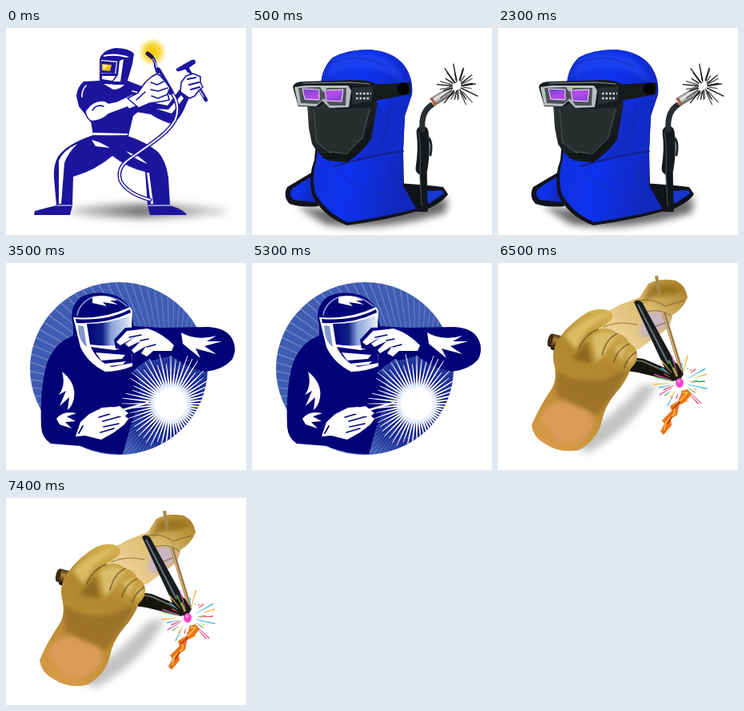
Recreate the animation shown at these times as an HTML page. Size 300 by 259 pixels, loop 8000 ms.

```html
<!DOCTYPE html>
<html lang="en">
<head>
<meta charset="utf-8">
<title>Welding</title>
<style>
html, body { margin: 0; width: 100%; height: 100%; overflow: hidden; background: #fff; }
svg { display: block; width: 100vw; height: 100vh; }
.scene { visibility: hidden; animation: 8s step-end infinite; }
#fighter { animation-name: first; }
#hood { animation-name: second; }
#badge { animation-name: third; }
#gloves { animation-name: fourth; }
@keyframes first { 0% { visibility: visible } 6.25%, 100% { visibility: hidden } }
@keyframes second { 0% { visibility: hidden } 6.25% { visibility: visible } 43.75%, 100% { visibility: hidden } }
@keyframes third { 0% { visibility: hidden } 43.75% { visibility: visible } 81.25%, 100% { visibility: hidden } }
@keyframes fourth { 0% { visibility: hidden } 81.25%, 100% { visibility: visible } }
.ink { fill: #1c159c; }
.cut { fill: #fff; stroke: #1c159c; stroke-width: 1.6; stroke-linejoin: round; }
.line { fill: none; stroke-linecap: round; stroke-linejoin: round; }
.w { fill: #fff; }
.navy { fill: #030378; }
</style>
</head>
<body>
<svg viewBox="0 0 300 259" preserveAspectRatio="none">
<defs>
  <filter id="soft" x="-30%" y="-60%" width="160%" height="220%"><feGaussianBlur stdDeviation="5"/></filter>
  <filter id="blur" x="-30%" y="-30%" width="160%" height="160%"><feGaussianBlur stdDeviation="2.5"/></filter>
  <radialGradient id="glow">
    <stop offset="0" stop-color="#f6c80c"/><stop offset=".5" stop-color="#f9d838"/><stop offset="1" stop-color="#fff3a0" stop-opacity="0"/>
  </radialGradient>
  <linearGradient id="floor">
    <stop offset="0" stop-color="#888" stop-opacity=".35"/><stop offset=".45" stop-color="#777"/><stop offset="1" stop-color="#aaa" stop-opacity=".35"/>
  </linearGradient>
  <linearGradient id="cloth" x1="0" x2="1" y2=".3">
    <stop offset="0" stop-color="#1230d2"/><stop offset=".5" stop-color="#0d32ee"/><stop offset="1" stop-color="#1228bd"/>
  </linearGradient>
  <linearGradient id="mask" x2="1" y2="1">
    <stop offset="0" stop-color="#343839"/><stop offset=".4" stop-color="#202425"/><stop offset="1" stop-color="#0b0d10"/>
  </linearGradient>
  <linearGradient id="steel" x2="0" y2="1">
    <stop offset="0" stop-color="#777"/><stop offset=".35" stop-color="#f2f2f2"/><stop offset="1" stop-color="#555"/>
  </linearGradient>
  <linearGradient id="lens" x2="1" y2="1">
    <stop offset="0" stop-color="#7040d4"/><stop offset=".5" stop-color="#b84ce6"/><stop offset="1" stop-color="#8444dc"/>
  </linearGradient>
  <radialGradient id="sky" gradientUnits="userSpaceOnUse" cx="206" cy="176" r="190">
    <stop offset="0" stop-color="#0b1585"/><stop offset=".27" stop-color="#142590"/><stop offset=".42" stop-color="#3e5cb2"/><stop offset="1" stop-color="#405cb2"/>
  </radialGradient>
  <linearGradient id="glass">
    <stop offset="0" stop-color="#030378"/><stop offset=".35" stop-color="#12208a"/><stop offset=".55" stop-color="#8ba2d8"/><stop offset="1" stop-color="#e6edfb"/>
  </linearGradient>
  <linearGradient id="hide" x1=".7" x2=".3" y2="1">
    <stop offset="0" stop-color="#d6b450"/><stop offset=".35" stop-color="#b18730"/><stop offset=".65" stop-color="#bd8d35"/><stop offset="1" stop-color="#d69a48"/>
  </linearGradient>
  <linearGradient id="hide2" x1=".1" y1=".7" x2="1" y2="0">
    <stop offset="0" stop-color="#efd39a"/><stop offset=".5" stop-color="#d9b96a"/><stop offset="1" stop-color="#a37a20"/>
  </linearGradient>
  <linearGradient id="brass" x2="0" y2="1">
    <stop offset="0" stop-color="#4c3510"/><stop offset=".4" stop-color="#b28a36"/><stop offset="1" stop-color="#2b1c08"/>
  </linearGradient>
  <clipPath id="disc"><ellipse cx="141" cy="132" rx="111" ry="108"/></clipPath>
  <clipPath id="palm"><path id="palmShape" d="M42 203Q51 181 66 159Q75 146 70 126Q66 108 78 92Q92 73 113 61Q132 54 142 62Q146 69 137 75L125 83Q139 79 149 88Q160 90 164 100Q174 105 174 116Q174 125 166 132Q160 149 147 163Q133 179 129 201Q123 222 101 234Q77 239 57 225Q44 218 42 203Z"/></clipPath>
</defs>

<g id="fighter" class="scene">
  <ellipse cx="178" cy="229" rx="102" ry="9" fill="url(#floor)" filter="url(#soft)"/>
  <circle cx="183" cy="30" r="18" fill="url(#glow)"/>
  <g id="halo"></g>
  <path class="ink" d="M109 134Q76 145 65 161Q59 171 60 188L63 222Q50 225 36 229L35 234H80L83 222L84 186Q112 178 133 160Q152 175 174 180L177 222L180 234H226Q222 227 205 222L203 187Q200 166 190 155Q174 142 152 135Z"/>
  <path class="w" d="M66 166Q71 153 89 145Q77 157 73 169L69 220H66ZM107 140L117 143L130 150L112 148ZM176 181L179 181L184 220H181ZM150 154L166 161L177 170Q160 164 150 154Z"/>
  <path d="M64 222L82 222M178 222L205 222" class="line" stroke="#fff" stroke-width="1.2"/>
  <path class="ink" d="M116 66L97 67Q89 74 88 85L91 98L106 117L109 134L153 135L159 110L176 96L178 76L152 66Z"/>
  <path class="w" d="M122 70L148 71Q142 77 134 77ZM109 131L152 132L152 134L109 134Z"/>
  <path d="M100 72Q94 78 95 89M158 79L172 82" class="line" stroke="#fff" stroke-width="1.6"/>
  <path class="cut" d="M103 91Q97 98 100 109Q104 118 114 119Q131 115 150 103L165 97L159 82L138 92L128 94Q119 86 103 91Z"/>
  <path class="ink" d="M89 82Q100 95 120 83L125 92Q113 91 106 97L99 105Q91 97 89 82ZM104 116Q119 116 128 107L152 98L155 102L130 115L112 121Z"/>
  <path d="M108 103Q113 95 122 98" class="line" stroke="#1c159c" stroke-width="1.6"/>
  <path class="ink" d="M169 80L179 79L187 94L202 97L217 77L229 87L222 103Q216 116 207 120Q193 116 181 108L163 105Z"/>
  <path class="w" d="M188 101L203 102L219 84L222 88L207 107Z"/>
  <path id="hose" d="M204 77Q220 95 211 116Q203 130 181 145L154 164Q138 175 143 191Q151 207 180 215" class="line" stroke="#1c159c" stroke-width="4.8"/>
  <path d="M204 77Q220 95 211 116Q203 130 181 145L154 164Q138 175 143 191Q151 207 180 215" class="line" stroke="#fff" stroke-width="2"/>
  <path d="M181 35Q187 40 187 49L192 57" class="line" stroke="#1c159c" stroke-width="3.6"/>
  <path d="M183 38Q188 43 188 50" class="line" stroke="#fff" stroke-width="1"/>
  <path d="M177 32L182 36" class="line" stroke="#17134f" stroke-width="5"/>
  <path d="M190 53L206 80" class="line" stroke="#1c159c" stroke-width="7"/>
  <path d="M191 57L202 74" class="line" stroke="#fff" stroke-width="1.6"/>
  <path class="cut" d="M152 88L165 81L174 68L182 61L189 57L193 60L200 68L205 75L202 82L204 90L194 92L180 94L166 100Z"/>
  <path d="M181 68L189 71L197 67M181 77L190 79L202 75M182 85L190 88L202 83M163 90L174 80" class="line" stroke="#1c159c" stroke-width="1.6"/>
  <path d="M225 48L250 90" class="line" stroke="#1c159c" stroke-width="4.4"/>
  <path d="M228 56L247 86" class="line" stroke="#fff" stroke-width="1.2"/>
  <path class="ink" d="M213 51Q212 55 217 54L227 51L237 44Q237 38 232 40L223 45Z"/>
  <path class="cut" d="M219 68L225 60L234 57L243 61L243 68L246 74L241 78L236 85L229 88L218 80Z"/>
  <path d="M227 64L237 62M229 71L241 68M231 77L242 74" class="line" stroke="#1c159c" stroke-width="2.2"/>
  <path class="ink" d="M117 39Q121 27 137 25Q153 25 160 32L158 45L151 69Q139 73 128 69L117 66Z"/>
  <path class="w" d="M122 34Q136 30 154 36L150 37Q136 33 122 36ZM142 41L147 39L143 67L134 67L140 59ZM120 60L137 60L133 66L120 64Z"/>
  <path class="cut" d="M118 39L140 41L138 58L118 57Z"/>
  <path class="ink" d="M119 41L138 43L136 57L119 56Z"/>
  <path d="M120 45L132 46L130 54L120 53Z" fill="#f4bd17"/>
  <path d="M121 46L128 46L122 52Z" fill="#fff2a5"/>
</g>

<g id="hood" class="scene">
  <path d="M55 222Q128 236 245 212L242 231Q160 256 92 246Z" fill="#444" filter="url(#soft)" opacity=".8"/>
  <path d="M76 180Q59 190 44 199Q38 211 47 220Q62 225 83 223Z" fill="#10131c"/>
  <path d="M77 184L50 201Q45 208 52 215L79 218Z" fill="url(#cloth)"/>
  <path d="M180 194Q214 196 239 199L245 208Q237 220 211 230L190 228Z" fill="#10131c"/>
  <path d="M213 204L238 203L240 207L221 220Z" fill="#1836d1"/>
  <path d="M86 72Q87 50 101 37Q119 27 146 27Q174 29 188 44Q202 61 200 83L191 110L189 153L190 197L211 228Q170 240 119 247Q87 235 75 208Q70 185 78 165Z" fill="#10131c"/>
  <path d="M86 72Q87 50 101 37Q119 27 146 27Q174 29 188 44Q202 61 200 83L191 110L189 153L189 197L205 226Q169 236 120 243Q91 230 79 206Q74 185 81 163Z" fill="url(#cloth)"/>
  <path d="M99 42Q129 25 166 38Q184 48 189 68Q169 51 139 51Q113 49 94 62Z" fill="#244cf5" opacity=".6" filter="url(#blur)"/>
  <path d="M156 93Q170 113 188 93L188 152Q156 160 128 169L149 140Z" fill="#122cc9"/>
  <path d="M189 154Q146 160 103 173" class="line" stroke="#111f87" stroke-width="2"/>
  <path d="M95 47Q127 28 170 48M173 91Q170 126 160 153M109 180Q128 202 164 208M172 169Q175 194 192 211" class="line" stroke="#14249b" stroke-width="1.1" opacity=".65"/>
  <path d="M149 71L197 68Q200 76 197 83L154 91Z" fill="#171a1b"/>
  <circle cx="189" cy="76" r="7.5" fill="#050505"/>
  <path d="M69 94L71 125L75 145Q83 159 95 166L119 168Q137 157 149 139L157 93Z" fill="url(#mask)"/>
  <path d="M73 99Q96 104 111 99L148 101L139 135L119 155L98 155L79 144Z" fill="#282d2e"/>
  <path d="M77 102L81 143L99 157M147 101L138 137L118 157L97 155" class="line" stroke="#424a4b" stroke-width="1.4"/>
  <path d="M86 158H110M88 162H109" stroke="#0a0c0d" stroke-width="1.5"/>
  <path d="M51 74Q52 67 65 67L132 65Q152 66 157 72L156 92L148 98L106 102L91 94L83 99L58 98Z" fill="#171b1d"/>
  <path d="M53 74L66 72L120 72L124 78L121 99L97 100L88 91L80 98L58 97Z" fill="#b8bec2"/>
  <path d="M58 75L85 74L89 80L94 75L118 75L117 97L97 97L90 88L82 95L61 94Z" fill="#4b5157"/>
  <path d="M63 76L84 77L84 90L66 89ZM91 78L114 77L112 92L93 91Z" fill="url(#lens)" stroke="#eeeaf4"/>
  <path d="M125 75L151 73L150 91L125 96Z" fill="#292f32"/>
  <path d="M130 82H149M130 88H148" stroke="#ddd" stroke-width="2.6" stroke-dasharray="2.5 2"/>
  <path d="M64 69L123 68L147 70" class="line" stroke="#8e9698" stroke-width="1.2"/>
  <path d="M214 170L215 230" class="line" stroke="#111619" stroke-width="9" style="stroke-linecap:butt"/>
  <path d="M213 130Q216 151 212 176" class="line" stroke="#15191b" stroke-width="15"/>
  <path d="M208 130Q212 152 210 180L212 222" class="line" stroke="#42494c" stroke-width="1.3"/>
  <path d="M220 137Q226 142 223 159" class="line" stroke="#22282a" stroke-width="3"/>
  <path d="M213 127Q211 105 225 96" class="line" stroke="#292e30" stroke-width="7"/>
  <g transform="rotate(-32 239 85)"><rect x="222" y="79" width="32" height="11" rx="2" fill="url(#steel)"/><path d="M225 79V90" stroke="#ad5f3b" stroke-width="3"/></g>
  <g id="burst"></g>
</g>

<g id="badge" class="scene">
  <g clip-path="url(#disc)">
    <rect width="300" height="259" fill="url(#sky)"/>
    <g id="beams"></g>
  </g>
  <path class="navy" d="M84 78Q78 57 92 44Q109 33 135 40Q152 46 157 64L160 79L194 81L253 80Q273 81 281 92Q290 106 283 120Q273 133 249 136Q222 130 205 115L180 119L158 135Q169 142 167 170L155 207L146 239Q116 239 94 229L56 226Q45 219 44 205Q42 157 51 126Q61 99 84 91Z"/>
  <path d="M89 65Q92 49 110 42Q136 39 151 54" class="line" stroke="#8ba1d5" stroke-width="1.6"/>
  <path class="w" d="M108 43Q125 38 139 47L130 47L140 52L121 49L126 54L108 50Z"/>
  <path class="w" d="M84 68Q122 71 155 55L158 60L157 78L158 129Q141 136 124 136Q102 125 93 105Z"/>
  <path class="navy" d="M87 70Q126 73 155 58L156 62Q125 77 88 75Z"/>
  <path d="M101 76Q130 76 154 66L157 99Q132 106 105 102Z" fill="url(#glass)"/>
  <path d="M90 78L97 79L101 105Q94 101 91 88Z" fill="#8096ce"/>
  <path class="navy" d="M106 105L136 109L157 103L158 125L132 130Q115 124 106 105Z"/>
  <path class="w" d="M112 112L149 115L145 120L119 122ZM123 126L150 123L146 127L128 129Z"/>
  <path class="navy" d="M135 96L149 81L177 80L202 89L215 103L211 115L183 122L163 117L149 108L137 107Z"/>
  <path class="w" d="M138 99L151 85L177 82Q196 88 210 103L207 110L184 110L176 117L169 113L175 104L160 113L157 109L168 98L153 105L149 101L162 92L143 103Z"/>
  <path d="M154 93L169 90M168 97L178 95M176 105L187 102" class="line" stroke="#030378" stroke-width="1.4"/>
  <path class="w" d="M219 87Q238 98 263 91L251 98L270 98L248 104L263 114L237 107L243 119L221 101ZM70 136Q88 150 85 169Q83 179 77 184L79 168L67 179L75 160L66 165Q75 153 70 136ZM63 195Q71 184 88 188L76 192L87 198L74 199L82 207L67 202Z"/>
  <path class="w" d="M93 199L104 189L120 181L133 180L145 188L153 195L148 202L135 212L119 221L99 216L87 217Z"/>
  <path d="M116 193L133 188M121 198L143 192M122 205L141 201M118 212L135 207M96 204L91 213" class="line" stroke="#030378" stroke-width="1.7"/>
  <path d="M139 187L177 177" class="line" stroke="#030378" stroke-width="9"/>
  <path d="M142 185L177 175" class="line" stroke="#fff" stroke-width="2.6"/>
  <path class="w" d="M121 183L142 179L153 188L148 192L133 191Z"/>
  <g clip-path="url(#disc)"><g id="flare"></g></g>
  <circle cx="206" cy="176" r="24" fill="#e8efff" filter="url(#blur)"/>
  <circle cx="206" cy="176" r="20" fill="#fff"/>
</g>

<g id="gloves" class="scene">
  <path d="M83 226Q140 199 178 154L199 151Q174 203 113 237Z" fill="#888" opacity=".5" filter="url(#soft)"/>
  <path d="M125 67L153 52L177 43L188 26Q202 18 222 22Q235 28 237 43Q231 58 218 65Q216 82 199 91L176 108L147 111L130 92Z" fill="url(#hide2)"/>
  <path d="M181 66Q193 56 211 64L215 77L188 94L177 91Z" fill="#cbb6c1" filter="url(#blur)"/>
  <path d="M190 29Q208 22 230 33Q220 41 197 42Q188 43 179 53Z" fill="#886310" opacity=".65" filter="url(#blur)"/>
  <path d="M177 47Q195 44 209 54L232 47M186 61Q201 56 216 66M195 80L211 74M132 80Q151 72 173 77" class="line" stroke="#805d25" stroke-width="1.4" opacity=".6"/>
  <path d="M198 16L202 41" stroke="#a98a4c" stroke-width="4"/>
  <path d="M207 62L230 137" stroke="#9b7946" stroke-width="4.5"/>
  <path d="M206 62L229 136" stroke="#d9bd82" stroke-width="1.4"/>
  <path d="M67 97L132 113L182 120L223 137L220 148L175 137L126 130L66 108Z" fill="#15150f"/>
  <path d="M139 117L181 123L219 140" class="line" stroke="#686552" stroke-width="2"/>
  <g transform="rotate(14 73 99)"><rect x="63" y="90" width="26" height="17" rx="4" fill="url(#brass)"/><ellipse cx="65" cy="98.5" rx="3" ry="8" fill="#3b2b12"/></g>
  <use href="#palmShape" fill="url(#hide)"/>
  <g clip-path="url(#palm)">
    <g filter="url(#blur)">
      <path d="M52 193Q70 164 97 179Q123 183 119 204Q107 229 75 224Z" fill="#e1a064" opacity=".75"/>
      <path d="M73 134Q95 151 133 146L163 132L143 166L124 191Q98 180 73 166Z" fill="#86601d" opacity=".55"/>
      <path d="M83 91Q107 68 137 63L112 83L97 108Z" fill="#e4c671" opacity=".8"/>
      <path d="M117 92Q136 81 149 91L134 113L123 125ZM145 104L162 102L154 124ZM163 111L174 115L163 130Z" fill="#d9bd69"/>
      <path d="M92 120L112 97L116 126Z" fill="#755119" opacity=".6"/>
    </g>
    <path d="M125 83Q109 89 101 107M149 88Q135 95 130 115M164 101Q148 109 145 124M173 111Q161 119 158 131" class="line" stroke="#654516" stroke-width="1.8" opacity=".65"/>
  </g>
  <path d="M170 49Q174 44 180 49L225 131L221 142L211 137Z" fill="#191c1f"/>
  <path d="M175 52L216 132" stroke="#687179" stroke-width="2"/>
  <path d="M210 127L223 125L232 139L226 149L217 145Z" fill="#171713"/>
  <path d="M219 131L224 142" stroke="#b69a3d" stroke-width="3"/>
  <g id="sparks"></g>
  <path d="M230 160L237 158L242 164L234 174L226 178L224 190L216 195L217 203L207 215L203 211L208 201L205 197L217 185L215 179L226 172Z" fill="#e97218"/>
  <path d="M231 162L237 162L228 172L220 180L221 188L210 199L208 208" class="line" stroke="#ffb53d" stroke-width="2"/>
  <path d="M227 174L219 182M217 193L212 201" class="line" stroke="#b83c12" stroke-width="2"/>
  <ellipse cx="227" cy="150" rx="5" ry="6" fill="#fa45c8"/>
  <circle cx="226" cy="148" r="2" fill="#ff9aea"/>
</g>
</svg>
<script>
const NS = 'http://www.w3.org/2000/svg';

function random(seed) {
  return () => (seed = seed * 16807 % 2147483647) / 2147483647;
}

// Tapered spikes around a centre; width grows or shrinks from inner to outer end.
function rays(id, o) {
  const next = random(o.seed || 7), group = document.getElementById(id);
  for (let i = 0; i < o.n; i++) {
    const jitter = o.jitter || 0;
    const a = (i + (next() - .5) * jitter) / o.n * Math.PI * 2;
    const inner = o.from + next() * (o.gap || 0);
    const outer = o.to - next() * (o.vary || 0);
    const c = Math.cos(a), s = Math.sin(a);
    const at = (r, w) => `${o.x + c * r - s * w} ${o.y + s * r + c * w}`;
    const [w0, w1] = o.width;
    const p = document.createElementNS(NS, 'path');
    p.setAttribute('d', `M${at(inner, w0)}L${at(outer, w1)} ${at(outer, -w1)} ${at(inner, -w0)}Z`);
    p.setAttribute('fill', o.colors[i % o.colors.length]);
    p.setAttribute('opacity', o.alpha || 1);
    group.append(p);
  }
}

rays('halo', { x: 183, y: 30, n: 36, from: 8, to: 19, vary: 4, width: [.6, .2], colors: ['#f8d640'], alpha: .7 });
rays('burst', { x: 257, y: 73, n: 27, from: 4, gap: 5, to: 29, vary: 14, jitter: 1.2, width: [.8, .6], colors: ['#111', '#555'], seed: 31 });
rays('beams', { x: 206, y: 176, n: 110, from: 40, to: 260, width: [.25, 1.1], colors: ['#9db0de'], alpha: .45 });
rays('flare', { x: 206, y: 176, n: 56, from: 17, to: 64, vary: 14, width: [1.3, .35], colors: ['#fff'] });
rays('sparks', { x: 228, y: 150, n: 34, from: 9, gap: 10, to: 37, vary: 17, jitter: .7, width: [.3, .8],
  colors: ['#f04b57', '#47b8e0', '#f3b22d', '#65bd59', '#e45bc0'], seed: 19 });
</script>
</body>
</html>
```
